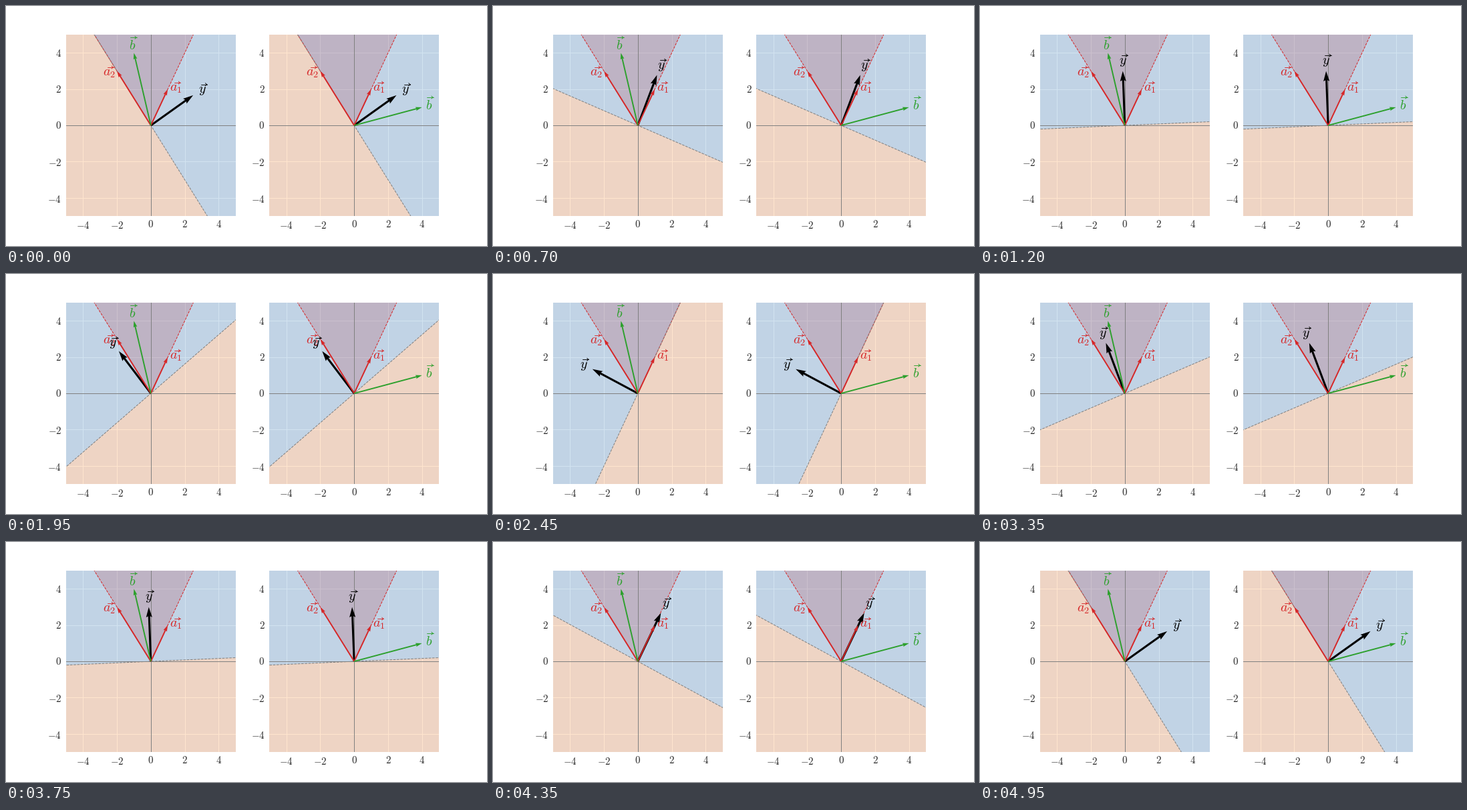
Write a matplotlib script that moves like this. It is 720 px wide and 360 px high and loops after 5 s.

```python
import numpy as np
import matplotlib.pyplot as plt
from matplotlib.animation import FuncAnimation

plt.rcParams.update({"figure.dpi": 72, "savefig.dpi": 72, "mathtext.fontset": "cm"})

W, H = 720, 360
LIM = 5
INK = "0.15"
RED, GREEN, BLUE, ORANGE = "tab:red", "tab:green", "tab:blue", "tab:orange"
STEPS = 50
A1, A2 = np.array([1, 2]), np.array([-2, 3])
# The normal turns from perpendicular to A2 to perpendicular to A1.
ANGLES = np.linspace(np.arctan2(2, 3), np.arctan2(1, -2), STEPS)
EM = 20

fig, axes = plt.subplots(1, 2, figsize=(W / 72, H / 72), dpi=72, facecolor="white")
fig.subplots_adjust(left=0.125, right=0.9, bottom=0.125, top=0.88, wspace=0.2)

# Overlay in pixel units, origin at the top left.
page = fig.add_axes([0, 0, 1, 1], zorder=5)
page.set(xlim=(0, W), ylim=(H, 0))
page.axis("off")


def to_page(ax, x, y):
    box = ax.get_position()
    px = (box.x0 + box.width * (x + LIM) / (2 * LIM)) * W
    py = (1 - box.y0 - box.height * (y + LIM) / (2 * LIM)) * H
    return px, py


class VecLabel:
    """A math symbol with a small arrow above; (x, y) is its baseline start."""

    def __init__(self, symbol, color, shift, rise):
        self.shift, self.rise = shift * EM, rise * EM
        self.text = page.text(0, 0, f"${symbol}$", color=color, fontsize=EM,
                              ha="left", va="baseline")
        style = dict(color=color, lw=0.9, solid_capstyle="round")
        self.shaft, = page.plot([], [], **style)
        self.head, = page.plot([], [], **style)

    def move(self, x, y):
        self.text.set_position((x, y))
        cx, cy = x + self.shift, y - self.rise
        tip = cx + 4.6
        self.shaft.set_data([cx - 4.6, tip], [cy, cy])
        self.head.set_data([tip - 2.6, tip - 1.6, tip, tip - 1.6, tip - 2.6],
                           [cy - 2, cy - 0.8, cy, cy + 0.8, cy + 2])


def arrow(ax, v, color, width, z):
    return ax.quiver([0], [0], [v[0]], [v[1]], color=color, angles="xy",
                     scale_units="xy", scale=1, width=width, zorder=z)


def tick_labels(ax):
    left, bottom = to_page(ax, -LIM, -LIM)
    for v in range(-4, 5, 2):
        x, y = to_page(ax, v, v)
        drop = 1.7 if v < 0 else 0
        style = dict(color=INK, fontsize=15, va="baseline")
        page.text(x, bottom + 17.3 + drop, f"${v}$", ha="center", **style)
        page.text(left - 7, y + 5.2 + drop, f"${v}$", ha="right", **style)


class Panel:
    def __init__(self, ax, b, b_label):
        self.ax = ax
        ax.set(xlim=(-LIM, LIM), ylim=(-LIM, LIM), facecolor="#EAEAF2")
        ax.set_xticks(range(-4, 5, 2), labels=[])
        ax.set_yticks(range(-4, 5, 2), labels=[])
        ax.tick_params(length=0)
        ax.set_axisbelow(True)
        ax.grid(color="white", lw=1)
        for spine in ax.spines.values():
            spine.set_visible(False)
        tick_labels(ax)

        cone = np.array([[0, 0], 8 * A1, 8 * A2])
        ax.fill(*cone.T, color=RED, alpha=0.2, lw=0)
        self.front, = ax.fill([0, 1, 1], [0, 0, 1], color=BLUE, alpha=0.2, lw=0)
        self.back, = ax.fill([0, 1, 1], [0, 0, 1], color=ORANGE, alpha=0.2, lw=0)
        ax.axhline(0, color="gray", lw=1)
        ax.axvline(0, color="gray", lw=1)
        for a in (A1, A2):
            ax.plot([0, 8 * a[0]], [0, 8 * a[1]], "--", color=RED, lw=1)
        self.edge, = ax.plot([], [], "--", color="gray", lw=1)

        self.y = arrow(ax, (1, 1), "black", 0.012, 3)
        arrow(ax, A1, RED, 0.0075, 3.1)
        arrow(ax, A2, RED, 0.0075, 3.1)
        arrow(ax, b, GREEN, 0.0075, 3.2)

        VecLabel("a_1", RED, 0.58, 0.615).move(*to_page(ax, 1.1, 1.9))
        VecLabel("a_2", RED, 0.58, 0.615).move(*to_page(ax, -2.85, 2.75))
        VecLabel("b", GREEN, 0.36, 0.878).move(*to_page(ax, *b_label))
        self.y_label = VecLabel("y", "black", 0.445, 0.615)

    def turn(self, angle):
        n = np.array([np.cos(angle), np.sin(angle)])
        t = np.array([-n[1], n[0]])
        ends = np.array([-10 * t, 10 * t])
        self.edge.set_data(*ends.T)
        for patch, side in ((self.front, 20), (self.back, -20)):
            patch.set_xy(np.vstack([ends, ends[::-1] + side * n]))
        self.y.set_UVC([3 * n[0]], [3 * n[1]])
        x, y = to_page(self.ax, *(3.6 * n))
        self.y_label.move(x - 0.263 * EM, y + 0.26 * EM)


panels = [Panel(axes[0], (-1, 4), (-1.3, 4.2)),
          Panel(axes[1], (4, 1), (4.2, 0.9))]


def update(i):
    k = min(i, 2 * STEPS - 1 - i)
    for panel in panels:
        panel.turn(ANGLES[k])
    return []


anim = FuncAnimation(fig, update, frames=2 * STEPS, interval=50, repeat=True,
                     repeat_delay=0, init_func=lambda: update(0), blit=False)
plt.show()
```
